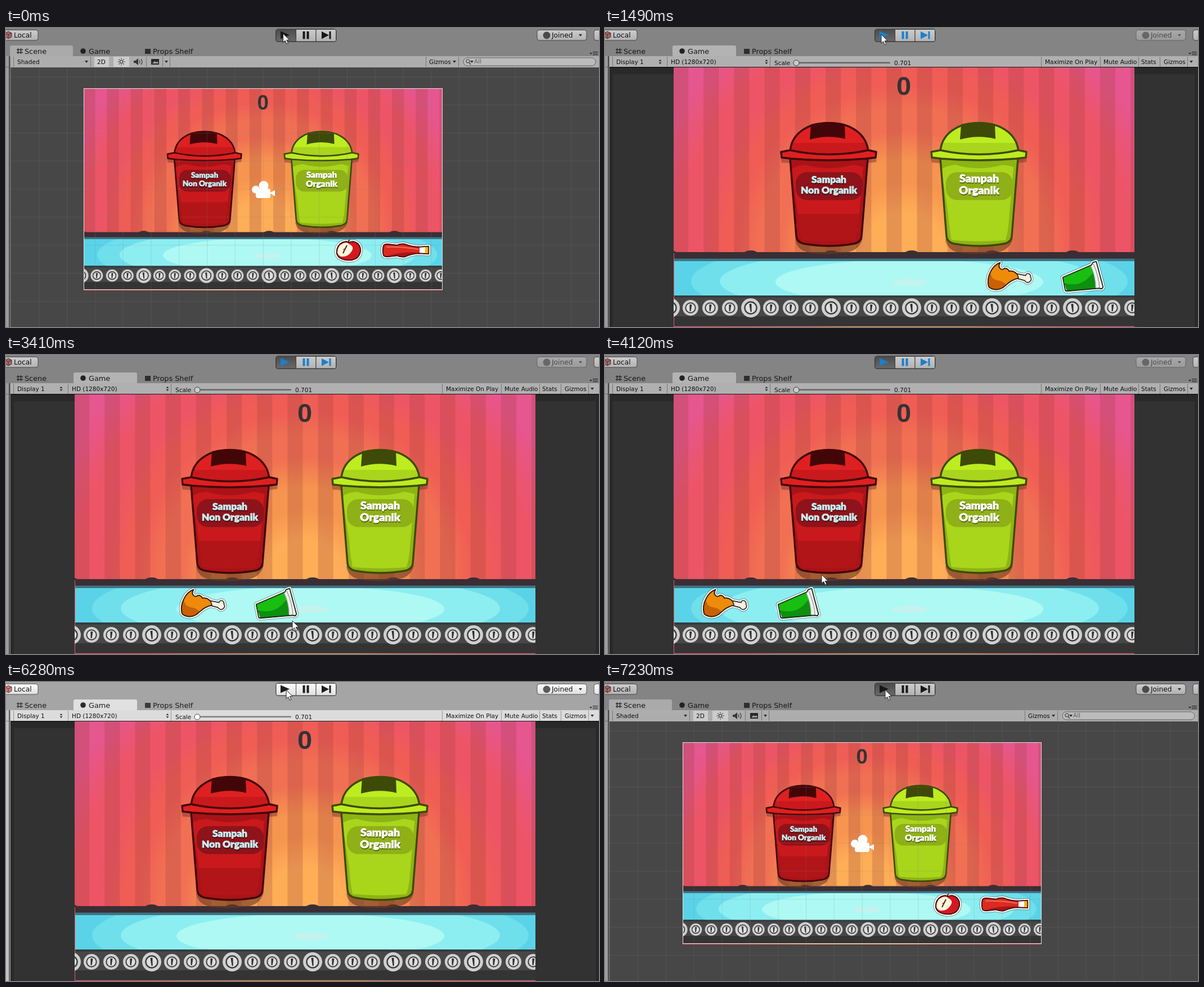
These frames come from a looping animation (1054 px wide and 531 px high, 8000 ms). An HTML page:

```html
<!DOCTYPE html>
<html lang="en">
<head>
<meta charset="utf-8">
<title>Waste sorting game in an editor</title>
<style>
html, body { margin: 0; width: 100%; height: 100%; overflow: hidden; background: #848484; }
svg { display: block; width: 100%; height: 100%; }
text { font-family: "DejaVu Sans", sans-serif; fill: #111; white-space: pre; }
.bar { font-size: 10.5px; }
.tab { font-size: 12.8px; fill: #1c1c1c; }
.btn { font-size: 12.2px; }
.label { font-family: Lato, "Open Sans", sans-serif; font-weight: 900; text-anchor: middle; stroke-width: .8px; }
.score { font-family: "Liberation Sans", Arial, sans-serif; font-weight: 700; font-size: 47px; text-anchor: middle; fill: #333; }
</style>
</head>
<body>
<svg id="stage" viewBox="0 0 1054 531" preserveAspectRatio="none"></svg>
<script>
const LOOP = 8000;
const START = 1490, STOP = 6040, BACK = 6430, TIP = 6830, PRESS = 7110;

const ticks = [0, 150, 1490, 1610, 1730, 1880, 2030, 2150, 2270, 2400, 2550, 2700, 2830, 2980,
  3110, 3260, 3410, 3540, 3690, 3820, 3970, 4120, 4250, 4400, 4520, 4670, 4790, 4940, 5060,
  5180, 5330, 5480, 6040, 6160, 6280, 6430, 6830, 7110, 7230];

// time, x, y
const cursorPath = [
  [0, 492.5, 10], [150, 491, 11.5], [1490, 491, 11.5], [1610, 496, 22], [1730, 506, 55],
  [1880, 520, 113], [2150, 530, 240], [2400, 497, 343], [2550, 476, 358], [2700, 420, 375],
  [2830, 349, 395], [2980, 266, 425], [3110, 325, 440], [3260, 440, 474], [3410, 509, 472],
  [3540, 430, 450], [3820, 395, 440], [4120, 385, 390], [4250, 398, 286], [4400, 462, 120],
  [4520, 512, 35], [4670, 510, 14], [4790, 504, 13], [4940, 502, 12], [5180, 498, 14], [8000, 498, 14]
];

// time, distance carried by the belt
const beltPath = [
  [1490, 0], [1730, -37], [2550, -197], [3410, -369], [3970, -476], [4940, -669], [5480, -772], [6040, -880]
];

function along(path, t) {
  let i = 1;
  while (i < path.length - 1 && path[i][0] <= t) i++;
  const a = path[i - 1], b = path[i];
  const k = Math.min(1, Math.max(0, (t - a[0]) / (b[0] - a[0])));
  return a.slice(1).map((v, n) => v + (b[n + 1] - v) * k);
}

const range = (n, f) => Array.from({ length: n }, (_, i) => f(i)).join('');
const rect = (x, y, w, h, fill, more = '') =>
  `<rect x="${x}" y="${y}" width="${w}" height="${h}" fill="${fill}" ${more}/>`;
const disc = (x, y, r, fill, more = '') => `<circle cx="${x}" cy="${y}" r="${r}" fill="${fill}" ${more}/>`;
const oval = (x, y, rx, ry, fill) => `<ellipse cx="${x}" cy="${y}" rx="${rx}" ry="${ry}" fill="${fill}"/>`;
const path = (d, fill, more = '') => `<path d="${d}" fill="${fill}" ${more}/>`;
const text = (x, y, s, cls, more = '') => `<text x="${x}" y="${y}" class="${cls}" ${more}>${s}</text>`;
const line = (d, stroke, w = 1, more = '') => path(d, 'none', `stroke="${stroke}" stroke-width="${w}" ${more}`);
const sep = x => rect(x, 51, 1, 18, '#959595');
const arrow = (x, y) => path(`M${x - 3} ${y - 2}h6l-3 4z`, '#333');
const updown = x => path(`M${x - 2.5} 59l2.5-3 2.5 3zM${x - 2.5} 61l2.5 3 2.5-3z`, '#333');

function sticker(d, inner) {
  const edge = (c, w, o = 1) => line(d, c, w, `stroke-linejoin="round" opacity="${o}"`);
  return edge('#333', 8.5, 0.5) + edge('#fff', 6.5) + edge('#1b1b1b', 2.4) + inner;
}

function backdrop() {
  const bands = [[100, '#ffae57'], [190, '#f6954f'], [285, '#f17053'], [335, '#f05d55'], [435, '#ed5566'], [560, '#e6568f']];
  let prev = 0;
  const stops = bands.map(([r, c]) => {
    const soft = (r - prev) * 0.3;
    const s = `<stop offset="${(prev + soft) / 560}" stop-color="${c}"/><stop offset="${(r - soft) / 560}" stop-color="${c}"/>`;
    prev = r;
    return s;
  }).join('');
  return `<radialGradient id="glow" gradientUnits="userSpaceOnUse" cx="531" cy="400" r="560">${stops}</radialGradient>`;
}

function gear(x, big) {
  const r = big ? 17 : 14;
  return disc(x, 497, r, '#d0d0d0') +
    disc(x, 497, r * 0.62, '#dedede', `stroke="#3d3d3d" stroke-width="${big ? 2.4 : 2}"`) +
    path(`M${x - 2} ${497 - r * 0.42}h4l-1 ${r * 0.84}h-2z`, '#2e2e2e', `transform="rotate(${big ? -5 : 4} ${x} 497)"`);
}

function conveyor() {
  return rect(123, 398, 818, 131.5, '#3a2e34') +
    range(6, i => path(`M${103 + i * 143} 400q4-5 13-5t13 5z`, '#3a2e34')) +
    rect(123, 409.5, 818, 5, '#3f7483') +
    `<g clip-path="url(#belt)">` + rect(123, 414, 818, 61, '#5ad3e8') +
    oval(541, 450, 388, 78, '#6fdfec') + oval(541, 450, 337, 58, '#8deef1') +
    oval(541, 451, 238, 40, '#aef9f3') + oval(541, 452, 32, 6.5, '#c4f2ee') + `</g>` +
    rect(123, 475, 818, 4, '#343c3d') + rect(123, 479, 818, 33, '#474747') + rect(123, 512, 818, 17.5, '#343434') +
    range(6, i => {
      const x = 116 + i * 143;
      return gear(x, true) + [36, 71, 106].map(d => gear(x + d, false)).join('');
    });
}

function bin(dx, c, label) {
  const body = 'M329 232L340 370Q341 380 353 383Q398 391 443 383Q455 380 456 370L467 232Z';
  const dome = 'M329 221C330 190 357 168.500 398 168.500S466 190 468 221Q398 232 329 221Z'.replace(/\.500/g, '.5');
  const rim = 'M313 220L329 217Q398 232 468 217L482 220L481 230L464 232Q398 238 331 232L314 230Z';
  const ink = `stroke="${c.ink}" stroke-width="3.4" stroke-linejoin="round"`;
  return `<g transform="translate(${dx} 0)">` +
    path('M338 375Q340 396 368 400Q400 404 432 398Q452 394 458 374Z', '#6b3a20', 'opacity=".6"') +
    path('M312 230L314 239L330 240L329 230ZM466 230L465 240L482 238L483 228Z', '#7d3a2a', 'opacity=".5"') +
    path(body, c.main) +
    path('M337 330H459L456 370Q455 380 443 383Q398 391 353 383Q341 380 340 370Z', c.low) +
    path('M329 234H467L466 251Q456 244 440 243Q398 255 356 243Q340 244 331 251Z', c.shade) +
    path('M467 234L456 372Q453 381 441 384Q449 372 451 340L459 250Z', c.shade) +
    path('M330 244L340 370Q341 380 350 382Q345 360 343 330Z', c.shade) +
    path('M342 376Q398 382 454 376Q452 382 443 383Q398 391 353 383Z', c.shade) +
    path(body, 'none', ink) +
    path(dome, c.light) + path('M333 204H464L468 221Q398 232 329 221Z', c.main) + path(dome, 'none', ink) +
    path('M366 171Q398 164 426 171L427 197Q396 189 364 198Z', c.ink) +
    path(rim, c.light, ink) +
    rect(339, 256, 119, 49.5, c.plate, 'rx="20"') + label + '</g>';
}

function label(lines, size, fill, shade) {
  const layer = (x, y, s, c) => text(x, y, s, 'label', `font-size="${size}" style="fill:${c};stroke:${c}"`);
  return lines.map(([s, y]) => layer(398.5, y + 2, s, shade) + layer(398, y, s, fill)).join('');
}

const red = { ink: '#430608', main: '#c9191c', light: '#df2021', low: '#b21518', shade: '#a91318', plate: '#8e131a' };
const green = { ink: '#3e4a08', main: '#a9d51c', light: '#bdec20', low: '#a9d51b', shade: '#8db414', plate: '#8fb016' };

function world() {
  return `<g clip-path="url(#frame)">` + rect(122, 70, 819, 461, 'url(#glow)') +
    range(16, i => rect(121 + i * 54.2, 70, 27.1, 328, '#963c3c', 'opacity=".24"')) +
    conveyor() +
    bin(0, red, label([['Sampah', 274.5], ['Non Organik', 293.5]], 17.3, '#c9f0f3', '#4d0a10')) +
    bin(267, green, label([['Sampah', 274], ['Organik', 295]], 19.6, '#fff', '#53680c')) +
    text(531, 119, '0', 'score') + '</g>';
}

function chicken() {
  const meat = 'M682 459Q679 446 685 434Q691 421 702 417Q698 423 702 427Q706 431 710 427Q716 427 718 432Q726 430 733 438L735 444Q722 447 713 456Q703 466 692 464Q685 463 682 459Z';
  const bone = 'M733 437L748 440Q749 435 754 437Q757 440 756 443Q759 446 755 450Q750 454 746 448L734 445Z';
  return sticker(meat + bone, path(bone, '#f5f0e2', 'stroke="#333" stroke-width="1"') + path(meat, '#ee8b0b') +
    path('M682 459Q679 446 685 434Q686 446 697 448Q708 449 713 456Q703 466 692 464Q685 463 682 459Z', '#c96205') +
    line(meat, '#3b2106', 1.6));
}

function cup() {
  const shell = 'M814 443L865 421L867 417L873 415L885 460L883 463L878 462L821 467Q818 467 818 464Z';
  const side = 'M814 443L863 422Q872 441 872 462L821 467Z';
  return sticker(shell, path(shell, '#f1f1f1') + path(side, '#18be10') +
    path('M816 453Q840 460 857 446Q865 438 868 434Q872 447 872 462L821 467Z', '#0d8f10') +
    line('M863 422Q872 441 872 462M868 419Q878 441 879 462', '#8d9a90', 1.3) + line(shell, '#143013', 1.3));
}

function apple() {
  const skin = 'M588 398Q588 386 598 381Q605 378 610 381Q618 377 626 384Q632 391 629 400Q626 410 614 412Q600 413 592 407Q588 403 588 398Z';
  return sticker(skin, path(skin, '#d31920') +
    path('M589 399Q589 386 600 382Q608 380 610 384Q620 388 614 397Q608 407 596 406Q590 404 589 399Z', '#fff6dd') +
    line('M609 382Q608 378 611 376M606 386L599 400', '#3a1a10', 1.8) +
    oval(601, 394, 1.4, 2.6, '#8b4a1c') + line(skin, '#4c080b', 1.5));
}

function bottle() {
  const glass = 'M671 387Q672 384 678 384L695 386Q701 383 709 384Q722 389 735 389L751 388V401L735 400Q722 400 709 406Q701 407 695 404L678 406Q672 406 671 403Q669 395 671 387Z';
  return sticker(glass, path(glass, '#dc2a20') + line('M676 389Q700 388 733 393', '#f26a55', 2) +
    path('M677 404Q700 398 733 398Q720 400 709 405Q701 406 695 403Z', '#a5161a') +
    path('M735 389L745 388V401L735 400Z', '#fff') + rect(745, 387.5, 6.5, 14, '#f5b418') + line(glass, '#4d0a0a', 1.4));
}

function sceneView() {
  const grid = range(21, i => `M${8.9 + i * 49.8} 70V531`) + range(10, i => `M8 ${87 + i * 49.8}H1054`);
  return rect(7, 31, 112, 20, '#d4d4d4', 'rx="3"') + rect(8, 50, 1046, 20, '#d8d8d8') +
    text(20, 64, 'Shaded', 'bar') + arrow(143, 60) + sep(13) + sep(150) +
    rect(157, 51, 26, 18, '#fff') + text(162, 64, '2D', 'bar') +
    rect(191, 51, 28, 18, '#fff') + disc(205, 60, 2.7, 'none', 'stroke="#444" stroke-width="1.2"') +
    range(8, i => line('M205 55.5v-2', '#444', 1.2, `transform="rotate(${i * 45} 205 60)"`)) +
    path('M227 58h3l5-4v12l-5-4h-3z', '#444') + line('M237 57q2 3 0 6M240 55q4 5 0 10', '#555', 1.3) +
    sep(249) + rect(258, 55, 14, 10, '#333') + path('M260 63l4-4 3 2 2-2 2 4z', '#ccc') + sep(278) + arrow(285, 60) + sep(291) +
    sep(746) + text(752, 64, 'Gizmos', 'bar') + arrow(797, 60) + sep(804) +
    rect(813, 53, 235, 14, '#ebebeb', 'rx="7" stroke="#7c7c7c"') +
    disc(821, 59, 3, 'none', 'stroke="#555" stroke-width="1.2"') + line('M823 61l3 4', '#555', 1.3) + arrow(828, 60) +
    text(832, 63, 'All', 'bar', 'style="fill:#777"') +
    rect(8, 70, 1046, 461, '#474747') +
    `<g transform="translate(138 107) scale(.779) translate(-122 -70)">${world()}</g>` +
    line(grid, '#808080', 1, 'opacity=".22"') +
    rect(138.5, 107.5, 637, 357, 'none', 'stroke="#e6e0dc"') +
    disc(458, 280, 8.5, '#fff') + disc(444, 287, 7, '#fff') + rect(444, 285, 26, 17, '#fff', 'rx="4"') +
    path('M469 293l9-5v11z', '#fff') + apple() + bottle();
}

function gameView() {
  return rect(120, 31, 113, 20, '#e0e0e0', 'rx="3"') + rect(8, 50, 1046, 20, '#dcdcdc') +
    sep(13) + text(20, 64, 'Display 1', 'bar') + updown(98) + sep(110) +
    text(117, 64, 'HD (1280x720)', 'bar') + updown(287) + sep(293) + text(301, 66, 'Scale', 'bar') +
    rect(345, 60.5, 162, 2.5, '#808080', 'rx="1"') + disc(340, 62, 5, '#fff', 'stroke="#444"') +
    text(514, 66, '0.701', 'bar') + sep(775) + text(782, 64, 'Maximize On Play', 'bar') + sep(880) +
    text(886, 64, 'Mute Audio', 'bar') + sep(948) + text(953, 64, 'Stats', 'bar') + sep(986) +
    text(993, 64, 'Gizmos', 'bar') + sep(1035) + arrow(1042, 60) +
    rect(8, 70, 1046, 461, '#292929') + rect(14, 82, 1034, 449, '#323232') + rect(8, 69, 1046, 2, '#1a1a1a') +
    world() + `<g id="items" clip-path="url(#frame)"><g id="moving">${chicken()}${cup()}</g></g>`;
}

function toolbar() {
  const cell = (x, id) => rect(x, 2.5, 35.5, 21.5, 'url(#face)', `id="${id}" stroke="#4b4b4b"`);
  return rect(-6, 3.5, 63, 18.5, 'url(#face)', 'rx="4" stroke="#555"') +
    path('M-1 9l5-3 6 3v7l-6 3-5-3z', '#cf7f7f', 'stroke="#5a3030"') + line('M-1 9l5 3 6-3M4 12v7', '#5a3030') +
    text(14, 17, 'Local', 'btn') +
    `<g clip-path="url(#buttons)">${cell(480, 'play')}${cell(515.5, 'pause')}${cell(551, 'step')}</g>` +
    rect(479.5, 2, 107.5, 22.5, 'none', 'rx="4" stroke="#4b4b4b"') +
    `<path id="icons" d="M488 5.5L504 12.5L488 19.5ZM527.5 6h4v13.5h-4zM534.5 6h4v13.5h-4zM561 6l13 6.7L561 19.5zM574.5 6h3v13.5h-3z"/>` +
    `<g id="share">` + rect(944, 3.5, 88, 18.5, 'url(#face)', 'rx="4" stroke="#555"') +
    disc(961, 13, 6.5, '#5c5c5c') + text(970, 17, 'Joined', 'btn') + arrow(1021, 13) + '</g>' +
    rect(1045, 3.5, 20, 18.5, 'url(#face)', 'rx="4" stroke="#555"');
}

function tabs() {
  return line('M21.5 36v10M26.5 36v10M19 38.5h11M19 43.5h11', '#333', 1.3) + text(33, 45.5, 'Scene', 'tab') +
    disc(137, 41, 4.8, '#2b2b2b') + text(147, 45.5, 'Game', 'tab') +
    rect(247, 37, 10, 9, '#3a3a3a') + text(261, 45.5, 'Props Shelf', 'tab') +
    path('M1037 44h5l-2.5 3z', '#333') + line('M1043 42.5h9M1043 45h9M1043 47.5h9', '#333') +
    rect(0, 50, 5, 481, '#c3c3c3') + rect(0, 69, 5, 1, '#808080') + rect(5, 50, 2, 481, '#5c5c5c');
}

const byId = id => document.getElementById(id);
byId('stage').innerHTML = `<defs>${backdrop()}
  <linearGradient id="face" x2="0" y2="1"><stop stop-color="#fff"/><stop offset="1" stop-color="#dedede"/></linearGradient>
  <linearGradient id="held" x2="0" y2="1"><stop stop-color="#5f5f5f"/><stop offset="1" stop-color="#838383"/></linearGradient>
  <clipPath id="frame"><rect x="122" y="70" width="819" height="461"/></clipPath>
  <clipPath id="belt"><rect x="123" y="414" width="818" height="61"/></clipPath>
  <clipPath id="buttons"><rect x="479.5" y="2" width="107.5" height="22.5" rx="4"/></clipPath></defs>` +
  rect(0, 0, 1054, 531, '#a5a5a5') + toolbar() +
  `<g id="scene">${sceneView()}</g><g id="game">${gameView()}</g>` + tabs() +
  path('M0 0H1054V70H8V531H0Z', '#000', 'id="tint" opacity=".2"') +
  `<g id="tip">${rect(480.5, 36.5, 31, 21, '#e4e4e4', 'rx="2" stroke="#555"')}${text(485, 51, 'Play', 'bar')}</g>` +
  path('M0 0V15.5L3.7 12.3L6.3 18.3L8.9 17.2L6.3 11.3H11.3Z', '#fff', 'id="cursor" stroke="#222" stroke-width="1"');

const ui = {};
for (const id of ['scene', 'game', 'items', 'moving', 'play', 'icons', 'share', 'tint', 'tip', 'cursor']) ui[id] = byId(id);
const show = (el, on) => el.setAttribute('display', on ? 'inline' : 'none');
const shift = (el, x, y) => el.setAttribute('transform', `translate(${x} ${y})`);

function draw(time) {
  const t = ticks.filter(k => k <= time).pop();
  const playing = t >= START && t < STOP;
  const inGame = t >= START && t < BACK;
  const held = t < STOP || t >= PRESS;
  show(ui.scene, !inGame);
  show(ui.game, inGame);
  show(ui.items, playing);
  show(ui.tint, held);
  show(ui.tip, t >= TIP && t < PRESS);
  ui.play.setAttribute('fill', held ? 'url(#held)' : 'url(#face)');
  ui.icons.setAttribute('fill', playing ? '#229fff' : '#1d1d1d');
  ui.share.setAttribute('opacity', playing ? 0.5 : 1);
  shift(ui.moving, along(beltPath, t)[0], 0);
  shift(ui.cursor, ...along(cursorPath, t));
}

const begin = performance.now();
function loop() {
  draw((performance.now() - begin) % LOOP);
  requestAnimationFrame(loop);
}
loop();
</script>
</body>
</html>
```
